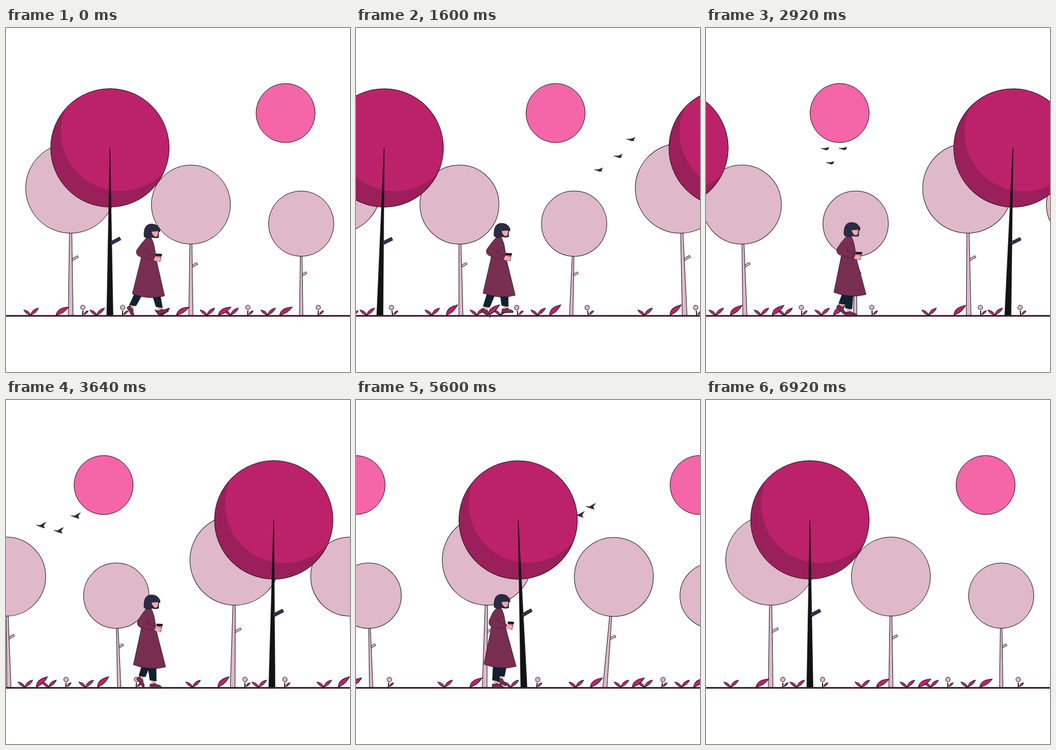
Animation of 640x640 px, one loop 6960 ms. Source, as an HTML page with a canvas:

```html
<!DOCTYPE html>
<html lang="en">
<head>
<meta charset="utf-8">
<title>Walk in the park</title>
<style>
html, body { margin: 0; width: 100%; height: 100%; overflow: hidden; background: #fff; }
canvas { display: block; width: 640px; height: 640px; }
</style>
</head>
<body>
<canvas id="stage" width="640" height="640"></canvas>
<script>
const g = document.getElementById('stage').getContext('2d');
const LOOP = 6960, SPAN = 6880, STEP = 860, GROUND = 535;
const INK = '#151318', PLUM = '#772e51', MAGENTA = '#bc226a', SHADE = '#9b1f5a',
  PINK = '#f566a8', PALE = '#dfb8ca', NAVY = '#0e2233', HAIR = '#2b2b44', SKIN = '#f8a9a6';
const { PI, sin, cos } = Math;

// Eased 0..1 progress of t from a to b.
function ease(t, a, b) {
  const p = Math.min(1, Math.max(0, (t - a) / (b - a)));
  return p * p * (3 - 2 * p);
}
// Leans to angle a at time ta, to b at tb, and is upright at both ends of the loop.
const sway = (t, [ta, a, tb, b]) =>
  a * ease(t, 0, ta) + (b - a) * ease(t, ta, tb) - b * ease(t, tb, SPAN);

function paint(path, fill, line = 1) {
  g.fillStyle = fill;
  g.fill(path);
  if (line) {
    g.lineWidth = line;
    g.strokeStyle = INK;
    g.stroke(path);
  }
}
const shape = (d, fill, line) => paint(new Path2D(d), fill, line);
function disc(x, y, r, fill, line) {
  const p = new Path2D();
  p.arc(x, y, r, 0, 7);
  paint(p, fill, line);
}
function bar(x1, y1, x2, y2, width, color) {
  g.beginPath();
  g.moveTo(x1, y1);
  g.lineTo(x2, y2);
  g.lineWidth = width;
  g.strokeStyle = color;
  g.stroke();
}
function at(x, y, deg, draw, scale = 1) {
  g.save();
  g.translate(x, y);
  g.rotate(deg * PI / 180);
  g.scale(scale, scale);
  draw();
  g.restore();
}

const paleTrees = [
  { x: 120.3, r: 83.7, h: 237, twig: 103, lean: [1720, -2, 4560, 2] },
  { x: 344, r: 73.5, h: 206.5, twig: 91, lean: [3440, -1.66, 5200, 5.4] },
  { x: 549.2, r: 60.8, h: 171, twig: 75, lean: [1960, 2, 4420, -3] }
];

function branch(y, length, width, color) {
  const tip = [length, y - length / 2];
  bar(1, y, ...tip, width + 1.6, INK);
  bar(1.6, y - 0.3, tip[0] - 0.7, tip[1] + 0.3, width, color);
}

function paleTree({ x, r, h, twig, lean }, shift, t) {
  const foot = r / 19, top = foot / 2;
  at(x + shift, GROUND, sway(t, lean), () => {
    branch(-twig, r / 6, 3, PALE);
    shape(`M${-foot} 0L${-top} ${r - h - 1}H${top}L${foot} 0Z`, PALE);
    disc(0, -h, r, PALE);
  });
}

function bigTree(shift, t) {
  at(193.3 + shift, GROUND, sway(t, [2440, 2, 5480, -2]), () => {
    const crown = new Path2D();
    crown.arc(0, -312, 110.2, 0, 7);
    g.fillStyle = SHADE;
    g.fill(crown);
    g.save();
    g.clip(crown);
    disc(19.3, -342, 110.2, MAGENTA, 0);
    g.restore();
    g.lineWidth = 1;
    g.strokeStyle = INK;
    g.stroke(crown);
    shape('M-6 0L-.3 -312H.3L6 0Z', '#131313', 0.5);
    branch(-134, 19.5, 5, '#34314d');
  });
}

function plants(shift, t) {
  const p = t / SPAN;
  const tilt = -16 * sin(3 * PI * p) ** 2 * (1 - p * p);
  const bend = -9 * sin(2 * PI * p);
  for (const x of [46, 169, 290, 374, 418, 487])
    at(x + shift, 534, 0, () => {
      shape('M0 0Q-3-8-13-9.5Q-9-1 0 0Z', MAGENTA);
      shape('M0 0Q2-11 14.5-13Q11-4 0 0Z', MAGENTA);
    });
  for (const x of [93, 317, 395, 509])
    at(x + shift, 534, tilt, () => shape('M0 0Q2-14 24-15Q15-3 3-.5Z', MAGENTA));
  for (const x of [143, 217, 450, 581]) {
    at(x + shift, 534, 0, () => shape('M2-1Q4-8 10-8Q8-2 2-1Z', MAGENTA));
    at(x + shift, 534, bend, () => {
      bar(0, 0, 0, -8, 2, INK);
      disc(0, -14, 4.2, PALE);
    });
  }
}

// Each bird passes (x, y) at the given second with speed vx, vy and acceleration ax.
const flock = [
  { time: 2.24, x: 350, y: 257, vx: -166, vy: -10, ax: -10 },
  { time: 2.24, x: 376, y: 231, vx: -176, vy: -11, ax: 0 },
  { time: 2.24, x: 372, y: 215, vx: -219, vy: 13, ax: 0 },
  { time: 4.76, x: 486, y: 206, vx: -150, vy: -8, ax: 0 },
  { time: 4.76, x: 542, y: 220, vx: -150, vy: -8, ax: 0 },
  { time: 4.76, x: 571, y: 200, vx: -160, vy: -2, ax: 0 }
];
function birds(t) {
  const wing = 0.65 + 0.35 * cos(2 * PI * t / 280);
  for (const b of flock) {
    const s = t / 1000 - b.time;
    at(b.x + b.vx * s + b.ax * s * s, b.y + b.vy * s, 0, () => shape(
      `M-9 ${0.5 - wing}L-2 0L3 ${-3 * wing}L${4 + 5 * wing} ${-6 * wing}L4.5 .5
       L${4 + 2.5 * wing} ${5 * wing}L1 3.5L-3 2Z`, HAIR, 0.6));
  }
}

// Phase u counts steps: planted from 0 to 1, swinging forward from 1 to 2.
function ankle(u, lead) {
  if (u < 1) {
    const strike = 1 - ease(u, -0.2, 0.2), lift = ease(u, 0.7, 1);
    return [286 - 52 * u, 528 - 6 * strike - 7 * lift, 58 * lift - 36 * strike];
  }
  const s = u - 1, arc = sin(PI * s);
  return [234 + 52 * s + lead * arc, 521 + 4 * s - 5 * arc, 58 * cos(1.85 * s)];
}

function leg(u, lead) {
  const [x, y, angle] = ankle(u, lead);
  const bent = u > 1 ? 5 * sin((u - 1) * PI) : 0;
  const kx = 265 + (x - 262) * 0.5 + bent, ky = 486;
  const ex = kx + (x - kx) * 0.9, ey = ky + (y - ky) * 0.86;
  bar(ex, ey - 2, x, y + 1, 6.5, SKIN);
  shape(`M${kx - 8} ${ky}L${ex - 6} ${ey - 1}L${ex + 6} ${ey + 1}L${kx + 8} ${ky}Z`, NAVY, 0.8);
  at(x, y, angle, () =>
    shape('M-5.5 0Q-7 5-5 7.5H14.5Q16 4 11 2.5Q6 2 3.5-1Q-1 2-5.5 0Z', PLUM, 0.8));
}

function walker(t) {
  const u = t / STEP % 2;
  const rise = 3 * sin(u % 1 * PI);
  const lift = sin(PI * (u / 2) ** 0.6) ** 4;
  leg((u + 1) % 2, 9);
  leg(u, -3);

  at(0, 0.6 - rise, 0, () => {
    shape(`M260 391Q266 387 271 391Q276 402 277 412L280 432L${295 + rise} 498
      Q${266 + rise} 506 ${235 + rise} 494L251 430L254 399Z`, PLUM, 0.8);

    const elbow = 5 * lift, hx = 4 * lift, hy = -5 * lift;
    at(hx, hy, 0, () => {
      shape('M280 423L288.5 423.5L287 433.5L281 433Z', PINK, 0.8);
      shape('M279 419.5L290 420L289.5 423.5L278.5 423Z', INK, 0.5);
      shape('M274 426Q279 423 282 426L287 427.5Q289 431 285 433Q279 434 274 431Z', SKIN, 0);
    });
    const sleeve = new Path2D(`M257 395Q254 397 ${243 + elbow} 413Q${241 + elbow} 420 ${247 + elbow} 424
      L${274 + hx} ${432 + hy}L${277 + hx} ${425 + hy}L${261 + elbow / 2} ${417 + hy / 2}L265 409`);
    paint(sleeve, PLUM, 0);
    g.lineWidth = 0.8;
    g.strokeStyle = '#4c1d38';
    g.stroke(sleeve);

    shape('M257 388Q255 364 271 364Q282 364 286.5 374L286.5 378L284 379L284 389Q278 391 272 389Q264 392 257 388Z', HAIR, 0.8);
    shape('M271 378.5L283 377.5L282.5 385Q280 389 276.5 387.5Q272 384 271 378.5Z', SKIN, 0);
  });
}

function frame() {
  const t = Math.floor(performance.now() % LOOP / 40) * 40;
  const shift = -640 * Math.min(t, SPAN) / SPAN;
  const copies = [shift, shift + 640];
  g.fillStyle = '#fff';
  g.fillRect(0, 0, 640, 640);
  copies.forEach(s => disc(520.2 + s, 158.2, 55, PINK));
  birds(t);
  copies.forEach(s => paleTrees.forEach(tree => paleTree(tree, s, t)));
  copies.forEach(s => bigTree(s, t));
  copies.forEach(s => plants(s, t));
  bar(0, 535.5, 640, 535.5, 3, INK);
  bar(0, 535.5, 640, 535.5, 1, PLUM);
  if (t <= SPAN) walker(t);
  requestAnimationFrame(frame);
}
frame();
</script>
</body>
</html>
```
